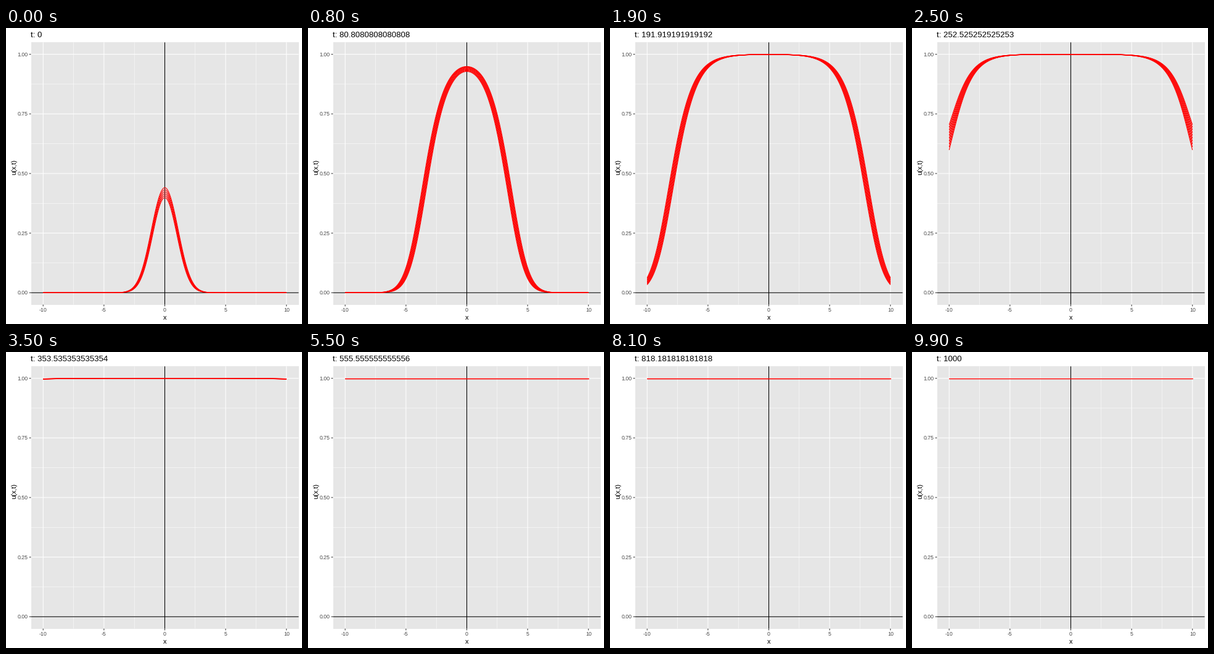
Write a matplotlib script that moves like this. It is 480 px wide and 480 px high and loops after 10000 ms.

```python
import numpy as np
import matplotlib.pyplot as plt
from matplotlib.animation import FuncAnimation
from matplotlib.collections import LineCollection
from matplotlib.patches import Rectangle

SIZE, DPI = 480, 72          # one point equals one pixel
FRAMES, STEPS = 100, 1000
LEFT, RIGHT, TOP, BOTTOM = 40.5, 474.5, 23.3, 448.6
LINE = 1.07

plt.rcParams["font.family"] = "Liberation Sans"


def px(x):
    return (LEFT + RIGHT) / 2 + x * (RIGHT - LEFT) / 22


def py(u):
    return BOTTOM - (u + 0.05) * (BOTTOM - TOP) / 1.1


def solve(diffusion=0.01, growth=0.05, half=11.0, dx=0.1, sub=4):
    """Logistic growth with diffusion, starting from a normal density."""
    x = np.linspace(-half, half, int(round(2 * half / dx)) + 1)
    u = np.exp(-x**2 / 2) / np.sqrt(2 * np.pi)
    dt = 1 / sub

    def rate(v):
        p = np.pad(v, 1, mode="reflect")
        return (diffusion * (p[2:] - 2 * v + p[:-2]) / dx**2
                + growth * v * (1 - v))

    rows = [u]
    for _ in range(STEPS):
        for _ in range(sub):
            mid = u + dt / 2 * rate(u)
            u = u + dt * rate(mid)
        rows.append(u)
    shown = np.abs(x) < 10 + dx / 2
    return x[shown], np.array(rows)[:, shown]


x, waves = solve()
group = np.rint(np.arange(STEPS + 1) * (FRAMES - 1) / STEPS).astype(int)

fig = plt.figure(figsize=(SIZE / DPI, SIZE / DPI), dpi=DPI, facecolor="white")
ax = fig.add_axes([0, 0, 1, 1])
ax.set_xlim(0, SIZE)
ax.set_ylim(SIZE, 0)
ax.axis("off")


def rule(xs, ys, color, width, z):
    ax.plot(xs, ys, color=color, lw=width, zorder=z, snap=False,
            solid_capstyle="butt")


def vertical(v, color, width, z):
    rule([px(v)] * 2, [TOP, BOTTOM], color, width, z)


def horizontal(v, color, width, z):
    rule([LEFT, RIGHT], [py(v)] * 2, color, width, z)


def label(x0, y0, s, size, color="black", ha="center", **kw):
    return ax.text(x0, y0, s, fontsize=size, color=color, ha=ha,
                   va="baseline", **kw)


ax.add_patch(Rectangle((LEFT, TOP), RIGHT - LEFT, BOTTOM - TOP,
                       fc="#e6e6e6", ec="none", zorder=0))

for v in (-7.5, -2.5, 2.5, 7.5):
    vertical(v, "white", LINE / 2, 1)
for v in (0.125, 0.375, 0.625, 0.875):
    horizontal(v, "white", LINE / 2, 1)

for v in (-10, -5, 0, 5, 10):
    vertical(v, "white", LINE, 2)
    rule([px(v)] * 2, [BOTTOM, BOTTOM + 2.75], "#333333", LINE, 2)
    label(px(v), 460.2, str(v), 8.8, "#4d4d4d")
for v in (0, 0.25, 0.5, 0.75, 1):
    horizontal(v, "white", LINE, 2)
    rule([LEFT - 2.75, LEFT], [py(v)] * 2, "#333333", LINE, 2)
    label(35.6, py(v) + 3.1, f"{v:.2f}", 8.8, "#4d4d4d", ha="right")

horizontal(0, "black", LINE, 3)
vertical(0, "black", LINE, 3)

label(px(0), 473, "x", 11)
label(13.6, (TOP + BOTTOM) / 2, "u(x,t)", 11, rotation=90)
title = label(40.5, 15, "", 13.2, ha="left")

curves = LineCollection([], colors="red", linewidths=LINE, zorder=4)
ax.add_collection(curves, autolim=False)


def draw(i):
    rows = waves[group == i]
    curves.set_segments([np.column_stack([px(x), py(u)]) for u in rows])
    title.set_text(f"t: {STEPS * i / (FRAMES - 1):.15g}")
    return curves, title


anim = FuncAnimation(fig, draw, frames=FRAMES, interval=100, repeat=True,
                     repeat_delay=0, blit=False)
plt.show()
```
